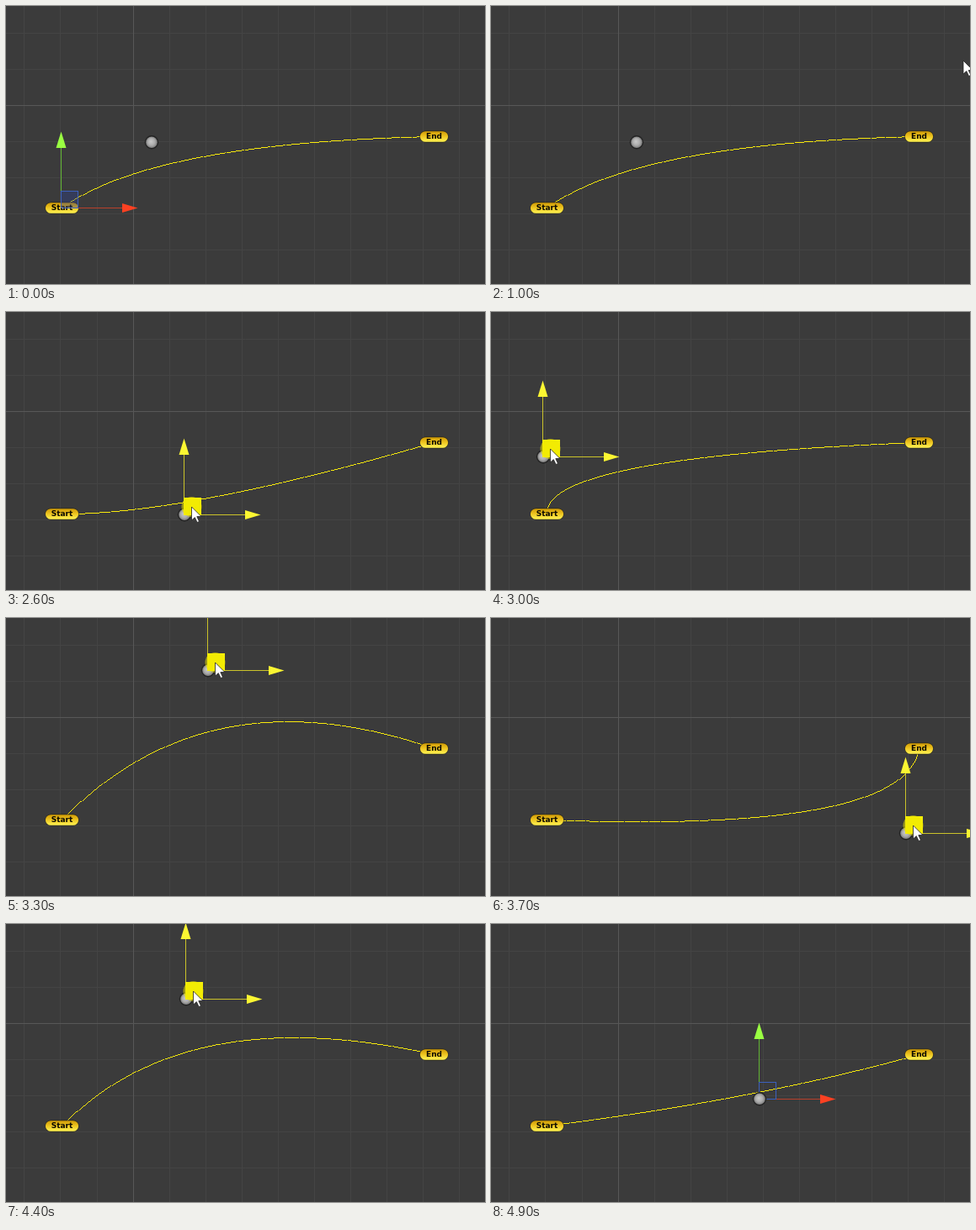
An HTML page with a canvas for the animation above (5.3 s loop, 569 px wide and 331 px high).

```html
<!DOCTYPE html>
<html lang="en">
<head>
<meta charset="utf-8">
<title>Curve handle</title>
<style>
html, body { margin: 0; width: 100%; height: 100%; overflow: hidden; background: #3b3b3b; }
canvas { display: block; }
</style>
</head>
<body>
<canvas id="stage" width="569" height="331"></canvas>
<script>
const ctx = document.getElementById('stage').getContext('2d');
const W = 569, H = 331, LOOP = 5300, STEP = 100, CELL = 43.07;
const START = [66, 240], END = [508, 155];
const ENTER = 1900, PRESS = 2100, RELEASE = 4600, LEAVE = 4800;

// Sweep of the pointer (time, x, y), measured at the handle it carries
const keys = [
  [ENTER, 290, 104], [PRESS, 173, 162], [2400, 235, 163], [2600, 212, 241],
  [2800, 112, 287], [3000, 62, 172], [3300, 240, 62], [3500, 440, 95],
  [3700, 493, 256], [3900, 330, 322], [4100, 33, 158], [4300, 165, 58],
  [RELEASE, 319, 208], [LEAVE, 527, 334]
];

const clamp = (v, lo, hi) => Math.max(lo, Math.min(hi, v));

function slope(i, axis) {
  const a = keys[Math.max(i - 1, 0)], b = keys[Math.min(i + 1, keys.length - 1)];
  return (b[axis] - a[axis]) / (b[0] - a[0]);
}

// Smooth cubic through the keys
function sweep(t) {
  let i = 0;
  while (i < keys.length - 2 && t >= keys[i + 1][0]) i++;
  const a = keys[i], b = keys[i + 1], span = b[0] - a[0], s = (t - a[0]) / span;
  return [1, 2].map(k => Math.round(
    a[k] + (b[k] - a[k]) * s * s * (3 - 2 * s) +
    span * s * (1 - s) * (slope(i, k) * (1 - s) - slope(i + 1, k) * s)));
}

const control = t => sweep(clamp(t, PRESS, RELEASE));

function pointer(t) {
  if (t >= 1000 && t < 1700) return [561, 65];
  if (t < ENTER || t > LEAVE) return null;
  const [x, y] = sweep(t);
  return [x + 8.5, y - 9];
}

function line(x1, y1, x2, y2, color) {
  ctx.strokeStyle = color;
  ctx.lineWidth = 1;
  ctx.beginPath();
  ctx.moveTo(x1, y1);
  ctx.lineTo(x2, y2);
  ctx.stroke();
}

function poly(points, color) {
  ctx.fillStyle = color;
  ctx.beginPath();
  for (const [x, y] of points) ctx.lineTo(x, y);
  ctx.closePath();
  ctx.fill();
}

function disc(x, y, r, color) {
  ctx.fillStyle = color;
  ctx.beginPath();
  ctx.arc(x, y, r, 0, 7);
  ctx.fill();
}

function grid() {
  ctx.fillStyle = '#3b3b3b';
  ctx.fillRect(0, 0, W, H);
  for (let x = 21.89; x < W; x += CELL) line(Math.floor(x) + .5, 0, Math.floor(x) + .5, H, '#444');
  for (let y = 32.5; y < H; y += 43) line(0, y, W, y, '#444');
  line(151.5, 0, 151.5, H, '#575757');
  line(0, 118.5, W, 118.5, '#575757');
}

// Quadratic curve in hard-edged pixels
function curve(p) {
  const at = (u, k) => (1 - u) ** 2 * START[k] + 2 * u * (1 - u) * p[k] + u * u * END[k];
  ctx.fillStyle = '#fbea0c';
  let [px, py] = START;
  for (let u = 0; u < 1; u += 1 / 6000) {
    const x = at(u, 0), y = at(u, 1);
    if (Math.max(Math.abs(x - px), Math.abs(y - py)) < 1) continue;
    ctx.fillRect(Math.round(x), Math.round(y), 1, 1);
    [px, py] = [x, y];
  }
}

function pill([x, y], half, text) {
  const cx = x + .5, cy = y + .5;
  const g = ctx.createLinearGradient(0, cy - 6, 0, cy + 6);
  g.addColorStop(0, '#d09c08');
  g.addColorStop(.45, '#ecc21e');
  g.addColorStop(1, '#fff250');
  ctx.fillStyle = '#2b2818';
  ctx.beginPath();
  ctx.roundRect(cx - half - .5, cy - 7, half * 2 + 1, 14, 7);
  ctx.fill();
  ctx.fillStyle = g;
  ctx.beginPath();
  ctx.roundRect(cx - half, cy - 6.3, half * 2, 12.6, 6.3);
  ctx.fill();
  ctx.font = 'bold 9px "DejaVu Sans", sans-serif';
  ctx.textAlign = 'center';
  ctx.fillStyle = '#0c0a00';
  ctx.fillText(text, cx, cy + 2.5);
}

function arrows([x, y], up, upLine, right, rightLine) {
  const cx = x - .5, cy = y + .5;
  line(cx, cy, cx, cy - 72, upLine);
  line(cx, cy, cx + 73, cy, rightLine);
  poly([[cx, cy - 91], [cx - 6, cy - 71.5], [cx + 6, cy - 71.5]], up);
  poly([[cx + 91, cy], [cx + 72.5, cy - 5.6], [cx + 72.5, cy + 5.6]], right);
}

function gizmo(p) {
  arrows(p, '#9aff42', '#62b534', '#fb4122', '#b9402b');
  ctx.strokeStyle = '#3c60bd';
  ctx.strokeRect(p[0] - .5, p[1] - 19.5, 20, 20);
}

function sphere([x, y]) {
  const cy = y + .2;
  const g = ctx.createRadialGradient(x - 1, cy - 1, 0, x, cy, 7);
  g.addColorStop(0, '#cacaca');
  g.addColorStop(.6, '#acacac');
  g.addColorStop(1, '#787878');
  disc(x, cy, 8.2, '#232323');
  disc(x, cy, 6.8, g);
}

function arrowCursor([x, y]) {
  const shape = [[0, 0], [0, 16], [3.8, 12.6], [6.6, 18.5], [9, 17.4], [6.3, 11.6], [11.4, 11.4]]
    .map(([a, b]) => [x + a, y + b]);
  poly(shape, '#fff');
  ctx.strokeStyle = '#222';
  ctx.lineWidth = .8;
  ctx.stroke();
}

function draw(t) {
  const p = control(t), held = t >= PRESS && t < RELEASE, tip = pointer(t);
  grid();
  curve(p);
  pill(START, 19.6, 'Start');
  pill(END, 16.6, 'End');
  if (t < 1000) {
    ctx.fillStyle = 'rgba(45,65,150,.35)';
    ctx.fillRect(START[0] - 1, START[1] - 20, 20, 20);
    gizmo(START);
  } else if (held) {
    arrows(p, '#fbf632', '#cbc32a', '#fbf632', '#cbc32a');
  } else if (t >= 1700) {
    gizmo(p);
  }
  sphere(p);
  if (held) {
    ctx.fillStyle = '#f4ee08';
    ctx.fillRect(p[0] - 1, p[1] - 20, 21, 21);
    disc(...tip, 12, 'rgba(240,232,0,.52)');
  }
  if (tip) arrowCursor(tip);
}

function frame() {
  const t = performance.now() % LOOP;
  draw(Math.floor(t / STEP) * STEP);
  requestAnimationFrame(frame);
}
frame();
</script>
</body>
</html>
```
